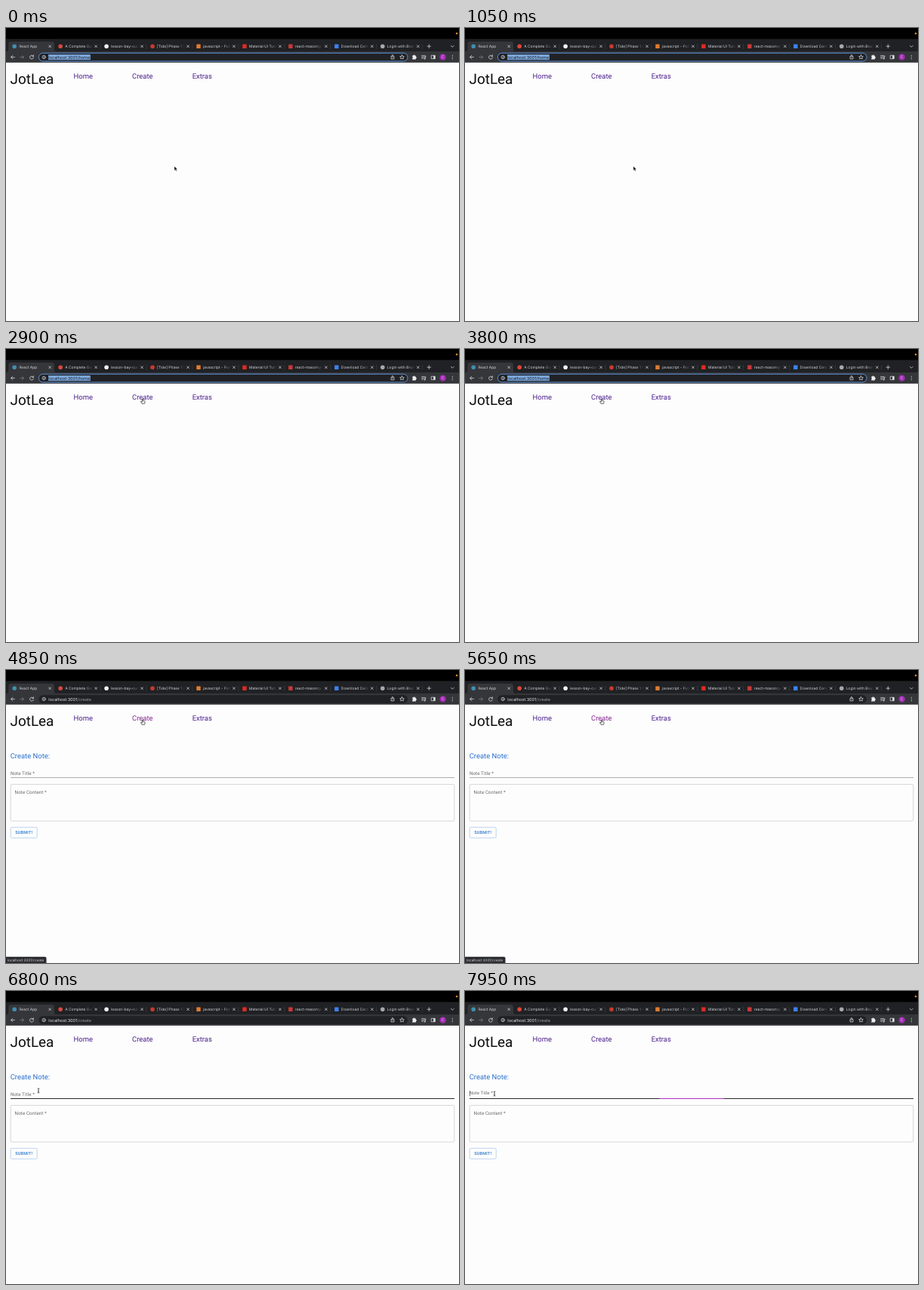
These frames come from a looping animation (600 by 388 pixels, 8000 ms). An HTML page:

```html
<!DOCTYPE html>
<html lang="en">
<head>
<meta charset="utf-8">
<title>Note form demo</title>
<style>
  html, body { margin: 0; width: 100%; height: 100%; overflow: hidden; background: #fdfdfd; }
  svg { display: block; width: 100vw; height: 100vh; }
  text { text-rendering: geometricPrecision; white-space: pre; }
  .ui { font-family: Inter, sans-serif; }
  .page { font-family: Roboto, sans-serif; }
  .tab { font-size: 4.95px; fill: #d3d5d9; }
  .link { font-size: 9.45px; fill: #4b1f8c; }
  .label { font-size: 6.3px; letter-spacing: .06px; fill: #6a6a6a; }
  .icon { fill: none; stroke: #d8dade; stroke-width: .75; stroke-linecap: round; stroke-linejoin: round; }
</style>
</head>
<body>
<svg viewBox="0 0 600 388" preserveAspectRatio="none">
  <defs>
    <linearGradient id="fade">
      <stop offset=".72" stop-color="#fff"/>
      <stop offset="1" stop-color="#fff" stop-opacity="0"/>
    </linearGradient>
    <mask id="titleFade" maskUnits="userSpaceOnUse" x="0" y="15" width="37" height="16">
      <rect y="15" width="37" height="16" fill="url(#fade)"/>
    </mask>
  </defs>

  <rect width="600" height="388" fill="#fdfdfd"/>

  <g class="page">
    <text x="5.5" y="73.5" font-size="18.9" fill="#0c0c0c">JotLea</text>
    <text class="link" x="89.6" y="67.2">Home</text>
    <text class="link" id="createLink" x="167" y="67.2">Create</text>
    <text class="link" x="246.7" y="67.2">Extras</text>
    <g id="form">
      <text x="5.7" y="117.2" font-size="9.45" fill="#2a6fce">Create Note:</text>
      <g id="titleLabel"><text class="label" y="2.2">Note Title *</text></g>
      <rect id="line" x="6" width="588"/>
      <rect id="focusLine" y="142" height="1" fill="#b52bcb"/>
      <rect id="caret" x="6" y="132.3" width=".6" height="7" fill="#222"/>
      <rect x="6.2" y="151.4" width="587.6" height="48.6" rx="1.6" fill="none" stroke="#bdbdbd" stroke-width=".6"/>
      <text class="label" x="11.6" y="164">Note Content *</text>
      <rect x="6.2" y="208.3" width="35" height="14" rx="1.6" fill="none" stroke="#8fbbe6" stroke-width=".6"/>
      <text x="12.2" y="217.4" font-size="5.6" font-weight="500" letter-spacing=".16" fill="#2a78cf">SUBMIT!</text>
    </g>
  </g>

  <g id="status" class="ui">
    <path d="M0 379.7H51.5a2 2 0 0 1 2 2V388H0Z" fill="#2b2c30"/>
    <text x="1.8" y="385.6" font-size="4.75" fill="#d5d6d9">localhost:3001/create</text>
  </g>

  <g class="ui">
    <rect width="600" height="15" fill="#000"/>
    <circle cx="597" cy="7.3" r="1.2" fill="#e8912d"/>
    <rect y="14.5" width="600" height="17" fill="#202124"/>
    <rect y="31" width="600" height="14.8" fill="#35363a"/>
    <path d="M0 31.2q3.3 0 3.3-3.2V21a3 3 0 0 1 3-3H61a3 3 0 0 1 3 3v7q0 3.2 3.3 3.2Z" fill="#35363a"/>
    <g id="tabs"></g>
    <path class="icon" d="M558 24.2h4.6M560.3 21.9v4.6M589.4 23.4l1.9 1.9 1.9-1.9"/>

    <path class="icon" d="M11.5 38.5H6.6M8.9 36.2L6.6 38.5l2.3 2.3"/>
    <path class="icon" style="stroke:#7c7e82" d="M18.7 38.5h4.9M21.3 36.2l2.3 2.3-2.3 2.3"/>
    <path class="icon" d="M36.1 37.2a2.5 2.5 0 1 0 .4 2M36.4 35.8v1.8h-1.8"/>
    <rect id="omnibox" x="43.4" y="33.2" width="488.6" height="10.8" rx="5.4" fill="#202124" stroke-width="1"/>
    <circle class="icon" cx="50.2" cy="38.5" r="2.2" stroke-width=".5"/>
    <path class="icon" d="M50.2 38.4v1.2M50.2 37.2v.1"/>
    <rect id="selection" x="56" y="35.1" width="55.8" height="7" fill="#7fa9dc"/>
    <text x="56.3" y="40.5" font-size="5.57"><tspan id="host">localhost:3001</tspan><tspan id="route"></tspan></text>

    <path class="icon" d="M510.9 37.5h-.9v3.4h4v-3.4h-.9M512 39v-3.3M510.9 36.6l1.1-1.1 1.1 1.1" stroke-width=".6"/>
    <path class="icon" d="M524.5 35.7l.85 1.8 2 .25-1.45 1.35.37 1.95-1.77-.97-1.77.97.37-1.95-1.45-1.35 2-.25Z"/>
    <path d="M538.2 36.6h1.3a1 1 0 0 1 2 0h1.4v1.4a1 1 0 0 1 0 2v1.4h-4.7v-1.5a1 1 0 0 0 0-1.9Z" fill="#eceef0"/>
    <path class="icon" d="M550.6 36.6h4.4M550.6 38.4h4.4M550.6 40.2h2.2M555.3 40.6v-3.2h1"/>
    <circle cx="554.6" cy="40.6" r=".9" fill="#d8dade"/>
    <path class="icon" d="M563.6 36.3h4.6v4.4h-4.6Z"/>
    <rect x="566.2" y="36.2" width="2.2" height="4.6" fill="#e4e6e8"/>
    <circle cx="578.6" cy="38.5" r="4.2" fill="#a32bb5"/>
    <text x="578.6" y="40.3" font-size="5" text-anchor="middle" fill="#f0d8f4">C</text>
    <g fill="#d8dade"><circle cx="591.3" cy="36.3" r=".6"/><circle cx="591.3" cy="38.5" r=".6"/><circle cx="591.3" cy="40.7" r=".6"/></g>
  </g>

  <g id="pointer" stroke-linejoin="round">
    <path id="arrow" d="M0 0V5.7L1.3 4.5 2.2 6.7 3.2 6.3 2.3 4.2H4.1Z" fill="#000" stroke="#fff" stroke-width=".4"/>
    <path id="hand" d="M-.6 .2Q0-.7.6.2V2.3L2.5 2.7Q3.3 3 3.1 4L2.5 6.3H-.9L-2.5 3.8Q-2.3 2.9-1.5 3.4L-.6 4Z" fill="#fff" stroke="#111" stroke-width=".65"/>
    <path id="beam" d="M-1.3-3Q0-3 0-2.3Q0-3 1.3-3M0-2.4V2.4M-1.3 3Q0 3 0 2.3Q0 3 1.3 3M-.6.9H.6" fill="none" stroke="#111" stroke-width=".7"/>
  </g>
</svg>
<script>
  const $ = id => document.getElementById(id);
  const set = (id, attrs) => { for (const k in attrs) $(id).setAttribute(k, attrs[k]); };
  const show = (id, on) => set(id, { opacity: +on });

  const LOOP = 8000, STEP = 50;
  const PRESS = 4200, ROUTE = 4400, LEAVE = 5850, FIELD = 6150, FOCUS = 7942;

  // Tab icons are plain circles or squares.
  const tabs = [
    ['React App', '#3f8fb0', 'circle'],
    ['A Complete Guid', '#d9483b', 'circle'],
    ['lesson-bay-curri', '#f2f2f2', 'circle'],
    ['[Tide] Phase 1 R', '#c8392f', 'circle'],
    ['javascript - Putti', '#e07b2e', 'square'],
    ['Material UI Tutor', '#e02a20', 'square'],
    ['react-masonry-c', '#cb3837', 'square'],
    ['Download Cente', '#3c82f0', 'square'],
    ['Login with Brun', '#a5a8ad', 'circle']
  ];
  $('tabs').innerHTML = tabs.map(([title, color, shape], i) => {
    const x = 17.2 + i * 60.95;
    const icon = shape === 'circle'
      ? `<circle cx="-6" cy="24.3" r="2.8" fill="${color}"/>`
      : `<rect x="-8.7" y="21.6" width="5.4" height="5.4" rx=".6" fill="${color}"/>`;
    const divider = i ? '<path d="M46.8 20.8v7" stroke="#4b4d52" stroke-width=".5"/>' : '';
    return `<g transform="translate(${x})">${icon}
      <g mask="url(#titleFade)"><text class="tab" y="26.1">${title}</text></g>
      <path class="icon" d="M39.6 22.9l2.8 2.8M42.4 22.9l-2.8 2.8"/>${divider}</g>`;
  }).join('');

  // time, x, y
  const path = [
    [0, 223, 183], [1450, 223, 183], [1700, 203, 145], [2000, 171, 86],
    [2300, 174, 74], [2550, 180, 70], [2650, 181, 66], [5700, 181, 66],
    [5900, 150, 80], [6050, 82, 112], [6250, 37, 137], [6400, 37, 137],
    [6750, 43, 132], [7100, 43, 132], [7500, 39, 136], [LOOP, 39, 136]
  ];
  function pointerAt(t) {
    const i = path.findIndex(p => p[0] > t);
    const [t0, x0, y0] = path[i - 1], [t1, x1, y1] = path[i];
    const k = (t - t0) / (t1 - t0);
    return [x0 + (x1 - x0) * k, y0 + (y1 - y0) * k];
  }

  // cubic-bezier(0, 0, .2, 1), solved for the curve parameter
  function decelerate(p) {
    let lo = 0, hi = 1;
    for (let i = 0; i < 24; i++) {
      const s = (lo + hi) / 2;
      if (.6 * s * s * (1 - s) + s ** 3 < p) lo = s; else hi = s;
    }
    return 3 * lo * lo * (1 - lo) + lo ** 3;
  }

  function draw(t) {
    const [x, y] = pointerAt(t);
    const inField = t >= FIELD, onLink = t >= 2600 && t < LEAVE;
    set('pointer', { transform: `translate(${x} ${y})` });
    show('hand', onLink);
    show('beam', inField);
    show('arrow', !onLink && !inField);

    const editing = t < PRESS, routed = t >= ROUTE, focused = t >= FOCUS;
    set('omnibox', { stroke: editing ? '#5f95e0' : 'none' });
    show('selection', editing);
    $('host').style.fill = editing ? '#14202f' : '#e8eaed';
    $('route').style.fill = editing ? '#14202f' : '#9aa0a6';
    $('route').textContent = routed ? '/create' : '/home';
    $('createLink').style.fill = t >= PRESS && t < LEAVE ? '#86268f' : '';

    const fadeIn = (t - PRESS + STEP) / 100, fadeOut = (6050 - t) / 150;
    set('status', { opacity: Math.max(0, Math.min(1, fadeIn, fadeOut)) });

    show('form', routed);
    set('line', inField ? { y: 142, height: 1, fill: '#2b2b2b' } : { y: 142.3, height: .7, fill: '#8c8c8c' });
    const grow = focused ? decelerate(Math.min(1, (t - FOCUS) / 200)) : 0;
    set('focusLine', { x: 300 - 294 * grow, width: 588 * grow });
    set('titleLabel', { transform: `translate(5.9 ${136.6 - 8.5 * grow}) scale(${1 - .25 * grow})` });
    show('caret', focused);
  }

  const start = performance.now();
  function tick(now) {
    const t = Math.max(0, now - start) % LOOP;
    draw(Math.floor(t / STEP) * STEP);
    requestAnimationFrame(tick);
  }
  draw(0);
  requestAnimationFrame(tick);
</script>
</body>
</html>
```
